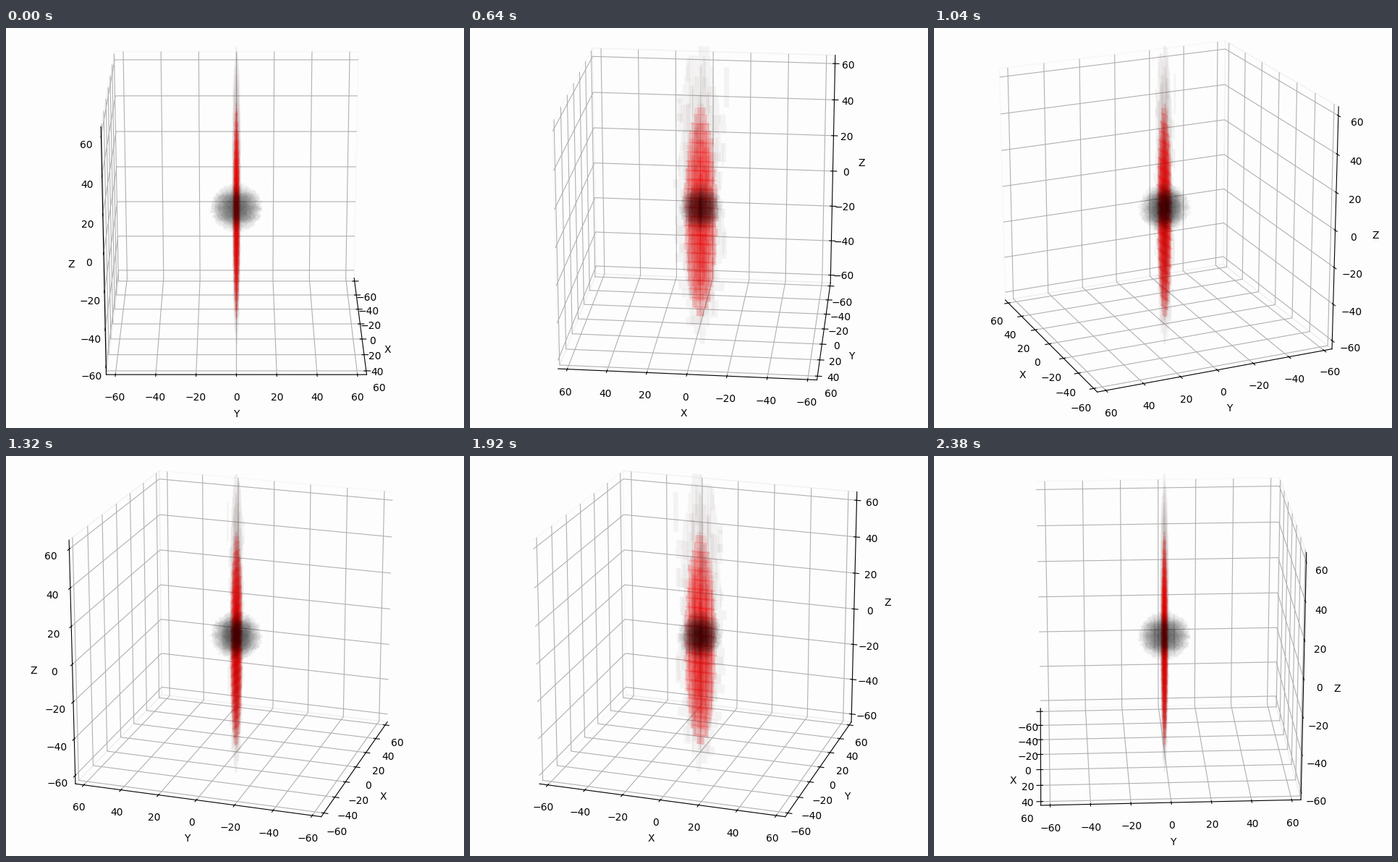
A matplotlib script that plays this animation: 633 by 553 pixels, repeating every 2400 ms.

```python
import numpy as np
import matplotlib.pyplot as plt
from matplotlib.animation import FuncAnimation
from mpl_toolkits.mplot3d.art3d import Poly3DCollection

FRAMES = 120
LIMIT = 64.58
PAPER = "#fdfdfd"
RED = (1, 0, 0)
HAZE = (0.25, 0.12, 0.12)
BLACK = (0, 0, 0)

rng = np.random.default_rng(7)


def loop(a, b, step, jag=0.0, shift=0.0):
    """Ellipse of half sizes a, b cut into rows with ragged ends."""
    n = max(int(2 * b / step), 5)
    rows = np.linspace(-b, b, n + 1)
    mid = (rows[1:] + rows[:-1]) / 2
    half = a * np.sqrt(1 - (mid / b) ** 2)
    left = np.minimum(-half + jag * rng.uniform(-1, 1, n), 0)
    right = np.maximum(half + jag * rng.uniform(-1, 1, n), 0)
    v = np.repeat(rows, 2)[1:-1] + shift
    u = np.concatenate([np.repeat(left, 2), np.repeat(right, 2)[::-1]])
    return u, np.concatenate([v, v[::-1]])


def place(normal, offset, uv):
    """Lift a flat outline into the plane normal = offset."""
    u, v = uv
    c = np.full(len(u), offset)
    order = {"x": (c, u, v), "y": (u, c, v), "z": (u, v, c)}
    return np.column_stack(order[normal])


class Cloud:
    def __init__(self):
        self.polys, self.colors = [], []

    def add(self, normal, offset, uv, color, alpha):
        self.polys.append(place(normal, offset, uv))
        self.colors.append((*color, alpha))

    def artist(self, zorder):
        return Poly3DCollection(self.polys, facecolors=self.colors,
                                edgecolors="none", linewidths=0,
                                zorder=zorder)


def streaks(cloud, count, color, alpha, spread, z_range, length):
    """Thin upright bars scattered over the plane y = 0."""
    for _ in range(count):
        x = np.clip(rng.normal(0, spread), -2.4 * spread, 2.4 * spread)
        z = rng.uniform(*z_range)
        w = rng.uniform(0.3, 1.3)
        h = rng.uniform(*length)
        top, low = min(z + h, 86), z - h
        u = np.array([x - w, x + w, x + w, x - w])
        v = np.array([low, low, top, top])
        cloud.add("y", rng.uniform(-0.8, 0.8), (u, v), color, alpha)


def column():
    cloud = Cloud()
    sx, sy, sz = 4.0, 0.8, 27.0

    # pale envelope
    for r in (3.0, 2.6):
        cloud.add("y", 0, loop(sx * r, sz * r, 5, 2.8, 5), HAZE, 0.045)
        for x in (-4, 0, 4):
            k = np.sqrt(r * r - (x / sx) ** 2)
            cloud.add("x", x, loop(sy * k, sz * k, 4, 0.25, 5), HAZE, 0.04)
    streaks(cloud, 46, HAZE, 0.045, 5.5, (-55, 76), (5, 14))

    # red body: upright slices both ways
    levels = np.arange(2.2, 0.3, -0.3)
    for r in levels:
        for y in (-0.5, 0.5):
            k = np.sqrt(max(r * r - (y / sy) ** 2, 0.05))
            cloud.add("y", y, loop(sx * k, sz * k, 4, 0.8, -3), RED, 0.11)
        for x in (-6, -3, 0, 3, 6):
            k2 = r * r - (x / sx) ** 2
            if k2 > 0.05:
                k = np.sqrt(k2)
                cloud.add("x", x, loop(sy * k, sz * k, 3, 0.12, -3), RED, 0.12)
    streaks(cloud, 60, RED, 0.06, 3.4, (-45, 38), (4, 11))

    # level slices that show as stripes
    for z in range(-60, 61, 5):
        for r in levels[::2]:
            k2 = r * r - ((z + 3) / sz) ** 2
            if k2 > 0.05:
                k = np.sqrt(k2)
                cloud.add("z", z, loop(sx * k * 1.05, sy * k, 0.5, 0.4),
                          RED, 0.17)
    return cloud.artist(2)


def core():
    cloud = Cloud()
    for r in (13, 11, 9, 7, 5):
        for c in (-5, 0, 5):
            if abs(c) >= r:
                continue
            k = np.sqrt(r * r - c * c)
            cloud.add("x", c, loop(k, 0.95 * k, 1, 0.9), BLACK, 0.042)
            cloud.add("y", c, loop(0.82 * k, 0.95 * k, 1, 0.8), BLACK, 0.042)
            cloud.add("z", c, loop(0.82 * k, k, 1, 0.7), BLACK, 0.042)
    return cloud.artist(3)


fig = plt.figure(figsize=(6.33, 5.53), dpi=100, facecolor=PAPER)
side = 585.4
ax = fig.add_axes([17.9 / 633, 3.9 / 553, side / 633, side / 553],
                  projection="3d", computed_zorder=False)
ax.set_facecolor(PAPER)
ax.set_box_aspect((1, 1, 1))
ax.add_collection3d(column())
ax.add_collection3d(core())

ticks = list(range(-60, 61, 20))
ax.set(xlim=(-LIMIT, LIMIT), ylim=(-LIMIT, LIMIT), zlim=(-LIMIT, LIMIT),
       xticks=ticks, yticks=ticks, zticks=ticks,
       xlabel="X", ylabel="Y", zlabel="Z")
for axis in (ax.xaxis, ax.yaxis, ax.zaxis):
    axis.pane.set_fill(False)


def update(i):
    # the tiny offset settles which walls count as the back ones
    ax.view_init(elev=20, azim=360 * i / FRAMES + 0.01)
    return []


anim = FuncAnimation(fig, update, frames=FRAMES, interval=20,
                     repeat=True, repeat_delay=0, blit=False)
plt.show()
```
